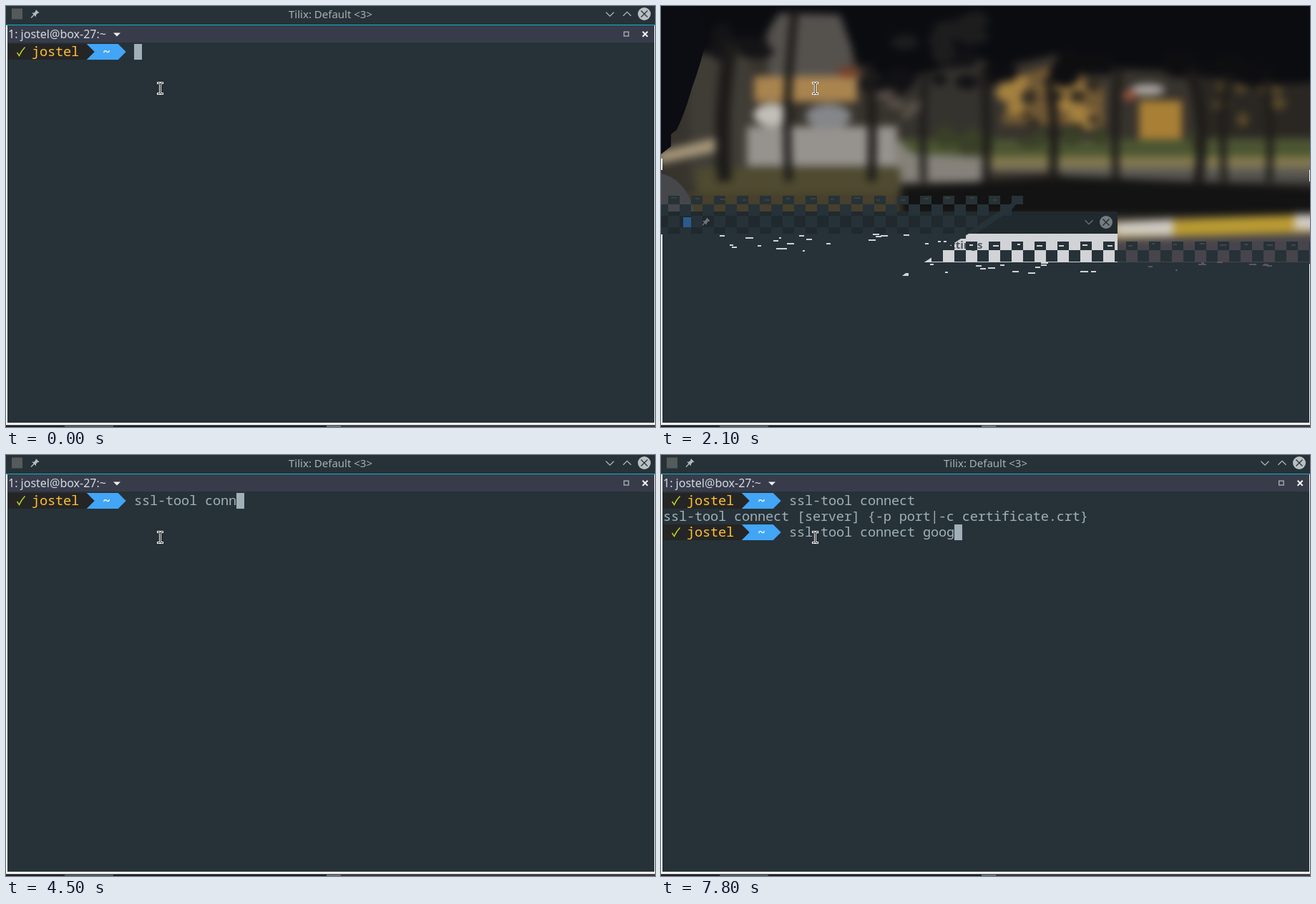
Recreate the animation shown at these times as an HTML page. Size 907 by 588 pixels, loop 8 s.

```html
<!DOCTYPE html>
<html lang="en">
<head>
<meta charset="utf-8">
<title>Terminal session</title>
<style>
html, body { margin: 0; width: 100%; height: 100%; overflow: hidden; background: #263238; }
svg { display: block; width: 100vw; height: 100vh; }
text { white-space: pre; }
.ui { font-family: "Noto Sans", sans-serif; }
.mono { font: 18.667px "Noto Sans Mono", "DejaVu Sans Mono", monospace; letter-spacing: -.2px; fill: #a1b0b8; }
</style>
</head>
<body>
<svg id="stage" viewBox="0 0 907 588" xmlns="http://www.w3.org/2000/svg"></svg>
<script>
const LOOP = 8000, CELL = 11, ROW = 22, LEFT = 3, TOP = 53, PROMPT = 16;
const BG = '#263238', USER = 'jostel', HOST = 'box-27';
const COMMAND = 'ssl-tool connect goog';
const USAGE = 'ssl-tool connect [server] {-p port|-c certificate.crt}';
const stage = document.getElementById('stage');

// time, row being typed, characters typed, cursor visible
const steps = [
  [0, 0, 0, 1], [200, 0, 0, 0], [700, 0, 1, 1], [900, 0, 2, 1], [1200, 0, 3, 1],
  [1500, 0, 4, 1], [1700, 0, 5, 1], [1800, 0, 6, 1], [2400, 0, 7, 1], [3100, 0, 9, 1],
  [3700, 0, 9, 0], [4200, 0, 10, 1], [4300, 0, 11, 1], [4400, 0, 12, 1], [4500, 0, 13, 1],
  [5100, 0, 16, 1], [5400, 1, 0, 1], [5500, 2, 0, 1], [6000, 2, 0, 0], [6500, 2, 0, 1],
  [6700, 2, 16, 1], [7300, 2, 17, 1], [7500, 2, 18, 1], [7700, 2, 20, 1], [7800, 2, 21, 1]
];

const rect = (x, y, w, h, fill, extra = '') =>
  `<rect x="${x}" y="${y}" width="${w}" height="${h}" fill="${fill}" ${extra}/>`;
const path = (d, fill, extra = '') => `<path d="${d}" fill="${fill}" ${extra}/>`;
const line = (d, stroke, width = 1.2) => path(d, 'none', `stroke="${stroke}" stroke-width="${width}"`);
const oval = (x, y, rx, ry, fill) => `<ellipse cx="${x}" cy="${y}" rx="${rx}" ry="${ry}" fill="${fill}"/>`;
const label = (x, y, size, fill, str, extra = '') =>
  `<text class="ui" x="${x}" y="${y}" font-size="${size}" fill="${fill}" ${extra}>${str}</text>`;
const mono = (col, row, str, extra = '') =>
  `<text class="mono" x="${LEFT + col * CELL}" y="${TOP + row * ROW + 17}" ${extra}>${str}</text>`;
const group = (id, body, extra = '') => `<g id="${id}" ${extra}>${body}</g>`;
const repeat = (n, make) => Array.from({ length: n }, make).join('');

function random(seed) {
  return () => (seed = (seed * 16807) % 2147483647) / 2147483647;
}

const pin = (x, y, color = '#b4babd') => `<g transform="translate(${x} ${y}) rotate(45)">` +
  path('M-3-6H3V-4.6H2V-1L4 1.4H.7V7H-.7V1.4H-4L-2-1V-4.6H-3Z', color) + '</g>';
const closeButton = (x, y, fill, ink) =>
  `<circle cx="${x}" cy="${y}" r="9" fill="${fill}"/>` +
  line(`M${x - 4.5} ${y - 4.5}l9 9m0-9l-9 9`, ink, 1.3);
const chevron = (x, y, dy, color = '#b4babd') => line(`M${x - 5.5} ${y - dy / 2}l5.5 ${dy}l5.5 ${-dy}`, color);

function prompt(row) {
  const y = TOP + row * ROW, tip = x => `M${x} ${y}l11 11l-11 11z`;
  return rect(113, y, 44, ROW, '#42a5f5') + path(tip(156.7), '#42a5f5') +
    rect(LEFT, y, 110, ROW, '#252525') + path(tip(112.7), '#252525') +
    line(`M15.5 ${y + 12}l3 4.5q3-7 8-12`, '#c3d82c', 1.4) +
    mono(3, row, USER, 'style="fill:#ffc135"') +
    mono(12, row, '~', 'dy="1" style="fill:#f5f5f5;font-weight:600"');
}

function frame() {
  return rect(0, 0, 907, 588, BG) +
    rect(0, 27, 2, 558, '#fcfcfc') + rect(906, 27, 1, 558, '#fcfcfc') +
    rect(0, 582, 907, 3.5, '#fcfcfc') + rect(0, 585.5, 907, 2.5, '#1b1e21') +
    rect(82, 586, 68, 2, '#50565a') + rect(448, 586, 20, 2, '#667074') + rect(468, 586, 439, 2, '#39373e');
}

function header() {
  return rect(0, 0, 907, 26, '#273238') + rect(0, 26, 907, 1.2, '#12afc3') +
    rect(2, 27.2, 904, 23.8, '#383c4a') +
    rect(8, 3.5, 15, 15, '#555a5c') + pin(40, 11.5) +
    label(453.5, 17, 15, '#a9b1b4', 'Tilix: Default &lt;3&gt;', 'text-anchor="middle"') +
    chevron(844, 11.5, 5.5) + chevron(868, 11, -5.5) + closeButton(892, 11, '#b9c0c3', '#273238') +
    label(3, 45, 16, '#d3dae3', `1: ${USER}@${HOST}:~`) +
    path('M150 37.5H160L155 42.5Z', '#eef0f2') +
    rect(863.7, 36.2, 6.4, 5.8, 'none', 'stroke="#a4a9b3" stroke-width="1.4"') +
    line('M889.7 35.7l7 7m0-7l-7 7', '#f4f5f6', 2);
}

// Out-of-focus street seen behind the window.
function backdrop() {
  const rnd = random(41);
  const blobs = (n, x, y, w, h, size, fill) => repeat(n, () =>
    oval(x + rnd() * w, y + rnd() * h, size * (.6 + rnd()), size * (.4 + rnd() * .8), fill));
  const trunk = (x, w, top, lean) => line(`M${x} ${top}Q${x + lean} 150 ${x + lean / 2} 245`, '#1d1b19', w);
  const soft = rect(-30, -30, 970, 420, '#37332d') +
    rect(40, 60, 85, 190, '#403d37') + rect(150, -10, 116, 112, '#55524e') +
    rect(340, 90, 130, 95, '#35332e') + rect(750, 90, 190, 92, '#2a2722') +
    rect(130, 98, 144, 36, '#a9844f') + oval(262, 92, 16, 8, '#73402c') +
    path('M475 165L495 98L555 80L620 112V168Z', '#705833') +
    blobs(9, 490, 95, 120, 65, 14, '#a5813f') + blobs(8, 500, 110, 110, 60, 9, '#332c22') +
    rect(668, 132, 60, 58, '#a97f35') + oval(680, 117, 24, 8, '#aaa5a1') + oval(655, 125, 10, 7, '#98523a') +
    blobs(7, 735, 110, 130, 60, 10, '#5e4c2b') + blobs(6, 310, 115, 60, 50, 9, '#5c534b') +
    rect(120, 168, 210, 56, '#96928d') + oval(155, 152, 26, 16, '#c2beb8') + oval(234, 154, 32, 17, '#84868a') +
    rect(330, 186, 600, 28, '#4b5532') + blobs(12, 340, 182, 560, 12, 14, '#3a4027') +
    rect(460, 210, 470, 12, '#83794a') + rect(460, 221, 470, 10, '#77705a') +
    path('M325 180L350 206L460 212V246H330Z', '#86827b') + rect(560, 229, 370, 16, '#55534f') +
    rect(50, 226, 285, 44, '#4f4b30') + path('M-10 205L78 184V203L0 220Z', '#a5967a') +
    path('M335 252L560 238L930 254V292H335Z', '#131313') + rect(-10, 262, 345, 40, '#463f2c') +
    rect(630, 315, 300, 70, '#47444c') +
    path('M625 302L930 290V316L625 325Z', '#b99a32') +
    path('M635 302L716 298V321H635ZM885 291H930V313H885Z', '#cfcac2') +
    path('M-20-20H930V105L830 112L740 92L640 88L560 66L480 84L440 74L380 92L320 104L275 82L250 12L165 10L140 50L75 68L-20 60Z', '#0b0c10') +
    blobs(14, 460, 65, 430, 30, 17, '#0e0e11') + blobs(6, 70, 40, 65, 35, 16, '#141316') +
    blobs(7, 290, 70, 140, 40, 16, '#121216') + blobs(7, 340, 20, 100, 50, 16, '#1d1d1e') +
    trunk(98, 20, 50, -18) + trunk(187, 11, 5, -16) + trunk(290, 12, 80, 8) + trunk(370, 9, 90, -6) +
    trunk(450, 11, 85, 8) + trunk(540, 12, 100, 14) + trunk(640, 10, 85, -8) +
    trunk(738, 14, 90, 26) + trunk(792, 9, 95, -10) + trunk(846, 9, 100, 8);
  return `<g filter="url(#soft)">${soft}</g>` +
    path('M0 0H46Q63 18 64 42Q57 78 43 115Q34 148 22 173L14 179V196L0 207Z', '#0c0d12') +
    path('M0 234Q24 239 38 264L48 290L30 320H0Z', '#45474b');
}

function popup() {
  return rect(0, 287, 638, 31, '#20292d') + rect(0, 318, 638, 42, '#d1d3d7') +
    rect(31, 295, 13, 14, '#2c5a8c') + pin(62, 302, '#6f777a') +
    chevron(598, 302, 5.5, '#6f787c') + closeButton(622, 302, '#757c7f', '#20292d') +
    label(388, 339, 15, '#51585d', 'Settings', 'font-weight="700"');
}

// Half-painted redraw: 16px checkers, a diagonal edge and stray dashes.
function tear() {
  const rnd = random(77);
  const dashes = (n, x, y, w, h, fill) => repeat(n, () =>
    rect(Math.round(x + rnd() * w), Math.round(y + rnd() * h), 3 + Math.round(rnd() * 8), 2, fill));
  const edge = y => 505 - (y - 265) * 1.49;
  let out = '';
  for (let y = 261; y < 357; y += 16) {
    const odd = ((y - 261) / 16) % 2;
    const low = y > 318;
    const ragged = y === 261 || y === 325;
    const top = ragged ? y + 4 : y;
    for (let x = -22 + odd * 16; x < 907; x += 32) {
      if (!low && x + 8 > edge(y)) continue;
      out += rect(x, top, 16, y + 16 - top, BG);
      if (ragged) out += rect(x + 2 + Math.round(rnd() * 6), y + 6 + Math.round(rnd() * 4), 4 + Math.round(rnd() * 5), 2,
        !low ? '#463f2c' : x < 638 ? '#d1d3d7' : '#47444c');
    }
  }
  out += path('M0 318H430L338 377H0Z', BG) + path('M505 265L426 318H440L490 285Z', BG) +
    rect(0, 358, 907, 20, BG) +
    dashes(18, 4, 318, 400, 16, '#d1d3d7') + dashes(4, 90, 336, 130, 9, '#d1d3d7') +
    dashes(14, 345, 358, 275, 14, '#d1d3d7') + dashes(9, 640, 357, 250, 11, '#5a5760') +
    path('M337 377L342 373H346V377Z', '#d1d3d7');
  return out + rect(0, 213, 2, 16, '#fcfcfc') + rect(0, 319, 2, 58, '#fcfcfc') +
    rect(906, 229, 1, 16, '#fcfcfc') + rect(906, 360, 1, 17, '#fcfcfc');
}

const ibeam = 'M212.5 107.5H214.5L215.5 108.5L216.5 107.5H218.5M215.5 108.5V121.5M212.5 122.5H214.5L215.5 121.5L216.5 122.5H218.5';

stage.innerHTML =
  '<defs><filter id="soft" x="-5%" y="-5%" width="110%" height="110%" color-interpolation-filters="sRGB">' +
  '<feGaussianBlur stdDeviation="6"/></filter>' +
  '<clipPath id="top"><rect width="907" height="377"/></clipPath></defs>' +
  frame() +
  group('term', header() + prompt(0) + mono(PROMPT, 0, '', 'id="first"') +
    group('usage', mono(0, 1, USAGE)) +
    group('second', prompt(2) + mono(PROMPT, 2, '', 'id="again"')) +
    rect(0, 0, CELL, ROW, '#a1b0b8', 'id="caret"')) +
  group('flash', backdrop() + popup() + tear(), 'clip-path="url(#top)"') +
  group('pointer', line(ibeam, '#fff', 3) + line(ibeam, '#000', 1), 'stroke-linecap="square"');

const part = Object.fromEntries(
  ['term', 'flash', 'first', 'usage', 'second', 'again', 'caret'].map(id => [id, document.getElementById(id)]));
const show = (el, on) => el.setAttribute('display', on ? 'inline' : 'none');

function draw(t) {
  const [, row, count, lit] = steps.findLast(s => s[0] <= t);
  const flash = t >= 2100 && t < 2200;
  show(part.flash, flash);
  show(part.term, !flash);
  show(part.usage, row > 0);
  show(part.second, row > 1);
  part.first.textContent = COMMAND.slice(0, row ? 16 : count);
  part.again.textContent = row > 1 ? COMMAND.slice(0, count) : '';
  const col = row === 1 ? 0 : PROMPT + count;
  part.caret.setAttribute('x', LEFT + col * CELL);
  part.caret.setAttribute('y', TOP + (row === 1 ? 2 : row) * ROW);
  show(part.caret, lit);
}

const start = performance.now();
function tick() {
  draw((performance.now() - start) % LOOP);
  requestAnimationFrame(tick);
}
tick();
</script>
</body>
</html>
```
